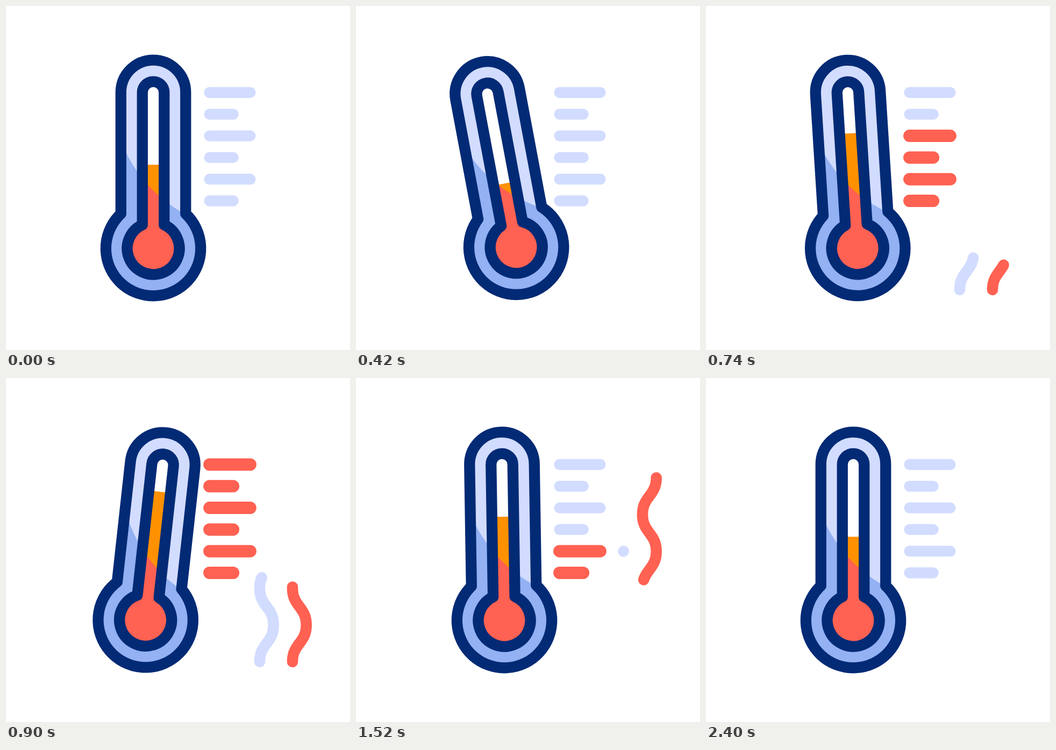
These frames come from a looping animation (640x640 px, 2420 ms). An HTML page with a canvas:

```html
<!DOCTYPE html>
<html lang="en">
<head>
<meta charset="utf-8">
<title>Thermometer</title>
<style>
  html, body { margin: 0; width: 100%; height: 100%; overflow: hidden; background: #fff; }
  canvas { display: block; width: 640px; height: 640px; }
</style>
</head>
<body>
<canvas id="stage" width="640" height="640"></canvas>
<script>
const ctx = document.getElementById('stage').getContext('2d');
const LOOP = 2420;
const NAVY = '#032a75', PALE = '#d2dcff', MID = '#93b1f3', RED = '#ff6152', ORANGE = '#ff9100';
const CX = 274, PIVOT_Y = 320, CAP_Y = 160.8, BULB_Y = 451;

// [time, value] keys, eased in and out between neighbours
const TILT = [[0, 0], [560, -12.6], [940, 6.9], [1260, -3.3], [1655, 0]];
const LEVEL = [[0, 295.5], [347, 336.5], [902, 211], [1230, 336], [1560, 255], [1900, 295.5]];
const WAVES = { from: 540, to: 1980 };
const PALE_WAVE = { x: 472, halves: 3, color: PALE, head: [[566, 0], [1055, 1]], tail: [[977, 0], [1466, 1]] };
const RED_WAVE = { x: 533, halves: 5, color: RED, head: [[562, 0], [1335, 1]], tail: [[1125, 0], [1977, 1]] };

const clamp = v => Math.min(1, Math.max(0, v));
const smooth = u => u * u * (3 - 2 * u);

function ease(keys, t) {
  let value = keys[0][1];
  for (let i = 1; i < keys.length; i++) {
    const [t0, a] = keys[i - 1], [t1, b] = keys[i];
    if (t >= t0) value = a + (b - a) * smooth(clamp((t - t0) / (t1 - t0)));
  }
  return value;
}

// Closed tube with a round cap on top and a bulb below
function tube(stemR, bulbR) {
  const path = new Path2D();
  const a = Math.acos(stemR / bulbR);
  path.arc(CX, CAP_Y, stemR, Math.PI, 0);
  path.arc(CX, BULB_Y, bulbR, -a, Math.PI + a);
  path.closePath();
  return path;
}

function circle(x, y, r) {
  const path = new Path2D();
  path.arc(x, y, r, 0, Math.PI * 2);
  return path;
}

const outer = tube(60.25, 88.25);
const inner = tube(20.25, 48.5);
const lightArea = circle(455, 160.6, 257.3);

function outline(path) {
  ctx.strokeStyle = NAVY;
  ctx.lineWidth = 20.3;
  ctx.stroke(path);
}

function fillInside(path, paint) {
  ctx.save();
  ctx.clip(path);
  paint();
  ctx.restore();
}

function drawThermometer(t) {
  const level = ease(LEVEL, t);
  ctx.save();
  ctx.translate(CX, PIVOT_Y);
  ctx.rotate(ease(TILT, t) * Math.PI / 180);
  ctx.translate(-CX, -PIVOT_Y);

  ctx.fillStyle = MID;
  ctx.fill(outer);
  fillInside(outer, () => {
    ctx.fillStyle = PALE;
    ctx.fill(lightArea);
  });
  outline(outer);

  ctx.fillStyle = '#fff';
  ctx.fill(inner);
  fillInside(inner, () => {
    ctx.beginPath();
    ctx.rect(CX - 60, level, 120, 520 - level);
    ctx.clip();
    ctx.fillStyle = RED;
    ctx.fillRect(CX - 60, level, 120, 520 - level);
    ctx.fillStyle = ORANGE;
    ctx.fill(lightArea);
  });
  outline(inner);
  ctx.restore();
}

// Bars switch on from the bottom up and off from the top down
function drawBars(t) {
  for (let i = 0; i < 6; i++) {
    const hot = t >= 840 - 60 * i && t < 1300 + 60 * i;
    const y = 161 + 40.3 * i;
    ctx.strokeStyle = hot ? RED : PALE;
    ctx.lineWidth = hot ? 23 : 20.3;
    ctx.beginPath();
    ctx.moveTo(378.6, y);
    ctx.lineTo(i % 2 ? 422.6 : 454.4, y);
    ctx.stroke();
  }
}

function wavePoint(x, w) {
  const half = Math.floor(w), part = w - half;
  const bend = smooth(part - 0.048 * Math.sin(2 * Math.PI * part));
  return [x + 25.7 * (half % 2 ? 1 - bend : bend), 528 - 68.5 * w];
}

function drawWave(wave, t) {
  const tail = ease(wave.tail, t) * wave.halves;
  const head = Math.max(tail + 0.002, ease(wave.head, t) * wave.halves);
  const steps = Math.ceil((head - tail) * 24);
  ctx.strokeStyle = wave.color;
  ctx.lineWidth = 20.6;
  ctx.beginPath();
  for (let i = 0; i <= steps; i++) {
    ctx.lineTo(...wavePoint(wave.x, tail + (head - tail) * i / steps));
  }
  ctx.stroke();
}

function draw() {
  const t = Math.floor(performance.now() % LOOP / 20) * 20;
  ctx.fillStyle = '#fff';
  ctx.fillRect(0, 0, 640, 640);
  ctx.lineCap = ctx.lineJoin = 'round';
  drawBars(t);
  if (t >= WAVES.from && t < WAVES.to) {
    drawWave(PALE_WAVE, t);
    drawWave(RED_WAVE, t);
  }
  drawThermometer(t);
  requestAnimationFrame(draw);
}
draw();
</script>
</body>
</html>
```
